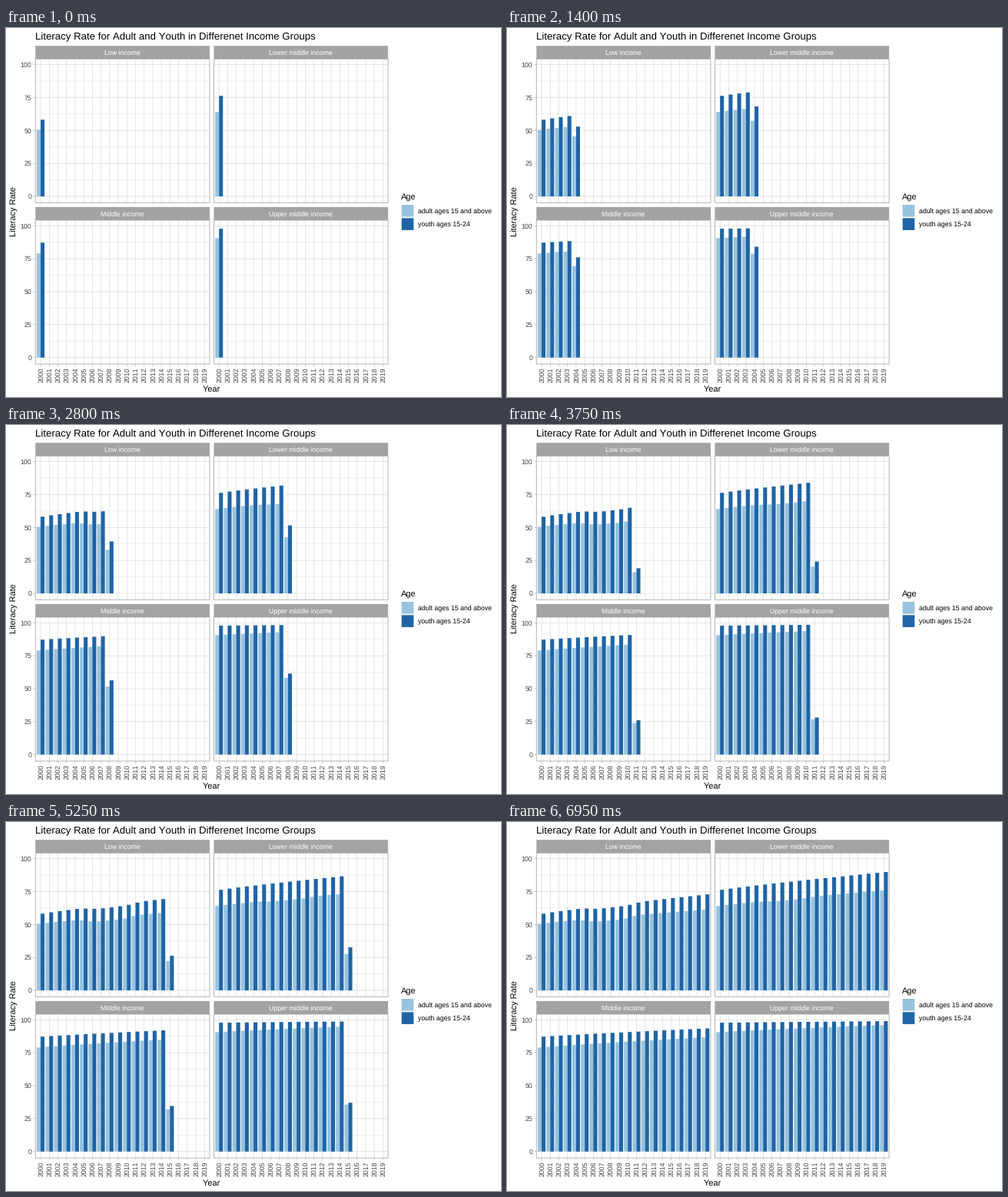
A matplotlib script for the animation above (10000 ms loop, 644 by 480 pixels).

```python
import matplotlib.pyplot as plt
import numpy as np
from matplotlib.animation import FuncAnimation
from matplotlib.collections import LineCollection, PolyCollection
from matplotlib.patches import Rectangle

W, H, DPI = 644, 480, 100
PX = 72 / DPI                      # points per pixel
N_FRAMES, STEP_MS, LAST = 200, 50, 139
N_YEARS = 20

ADULT, YOUTH = "#98C3DE", "#1E64A6"
STRIP, BORDER, GRID = "#A3A3A3", "#B5B5B5", "#D6D6D6"
AXIS_TEXT = "#444444"

LEFT, TOP, GAP = 38.3, 23.2, 5.5
PANEL_W, PANEL_H, STRIP_H = 226.65, 187.1, 17.1
YEAR_W = PANEL_W / (N_YEARS + 0.2)  # 0.6 of a category pads each end
UNIT = 1.714                        # pixels per percentage point
BASE = 8.4                          # zero line above the panel's bottom edge
BAR_W = 0.45 * YEAR_W

# Each age group: rate in 2000, rate in 2019, depth of the dip around 2008
PANELS = {
    "Low income": ((50.5, 61.2, 2.5), (58.2, 72.8, 1.9)),
    "Lower middle income": ((64, 75.8, 1), (76.3, 89.8, 0)),
    "Middle income": ((79, 86.7, 0), (87.2, 93.5, 0)),
    "Upper middle income": ((90.6, 96, 0), (97.8, 99, 0)),
}

plt.rcParams["font.family"] = "Liberation Sans"
plt.rcParams["text.hinting"] = "none"
plt.rcParams["text.kerning_factor"] = 6

fig = plt.figure(figsize=(W / DPI, H / DPI), dpi=DPI, facecolor="white")
ax = fig.add_axes([0, 0, 1, 1])
ax.set_xlim(0, W)
ax.set_ylim(H, 0)
ax.axis("off")

years = np.arange(N_YEARS)
ends = np.round(years * LAST / (N_YEARS - 1))   # frame at which a year is full


def rates(start, end, dip):
    rise = (years / years[-1]) ** 0.9
    return start + (end - start) * rise - dip * np.exp(-((years - 8) / 2.8) ** 4)


def write(x, y, text, size, color="black", ha="left", rotation=0):
    ax.text(x, y, text, fontsize=size * PX, color=color, ha=ha, va="baseline",
            rotation=rotation, rotation_mode="anchor", zorder=6)


def lines(segments, color, width, zorder):
    group = LineCollection(segments, colors=color, linewidths=width * PX,
                           zorder=zorder)
    group.set_snap(False)
    ax.add_collection(group, autolim=False)


def box(x, y, w, h, zorder=4, **style):
    ax.add_patch(Rectangle((x, y), w, h, zorder=zorder, snap=False, **style))


def year_x(left):
    return left + (0.6 + years) * YEAR_W


def corner(index):
    """Left and strip top of a panel in the two by two layout."""
    row, col = divmod(index, 2)
    return LEFT + col * (PANEL_W + GAP), TOP + row * (STRIP_H + PANEL_H + GAP)


def zero_line(strip_top):
    return strip_top + STRIP_H + PANEL_H - BASE


def draw_panel(index, title):
    left, strip_top = corner(index)
    top = strip_top + STRIP_H
    right, bottom = left + PANEL_W, top + PANEL_H
    zero = zero_line(strip_top)
    xs = year_x(left)

    def level(v):
        y = zero - v * UNIT
        return [(left, y), (right, y)]

    lines([level(v) for v in np.arange(12.5, 100, 25)], GRID, 0.3, 1)
    lines([level(v) for v in range(0, 101, 25)]
          + [[(x, top), (x, bottom)] for x in xs], GRID, 0.6, 2)
    box(left, top, PANEL_W, PANEL_H, fill=False, ec=BORDER, lw=PX)
    box(left, strip_top, PANEL_W, STRIP_H, fc=STRIP, ec="none", zorder=5)
    write(left + PANEL_W / 2, strip_top + 11.9, title, 8.8, "white", "center")

    if index % 2 == 0:
        for v in range(0, 101, 25):
            y = zero - v * UNIT
            lines([[(left - 2.75, y), (left, y)]], STRIP, 0.6, 4)
            write(33.2, y + 3.2, str(v), 8.8, AXIS_TEXT, "right")
    if index >= 2:
        lines([[(x, bottom), (x, bottom + 2.75)] for x in xs], STRIP, 0.6, 4)
        for x, year in zip(xs, years):
            write(x + 3.1, 451.6, str(2000 + year), 8.8, AXIS_TEXT, "center", 90)


def bar_group(age, color):
    """Collection of one age group's bars with their geometry."""
    group = PolyCollection([], facecolors=color, edgecolors="none", zorder=3)
    group.set_snap(False)
    ax.add_collection(group, autolim=False)
    spots = []
    for index, series in enumerate(PANELS.values()):
        left, strip_top = corner(index)
        spots.append((year_x(left) + (age - 1) * BAR_W, zero_line(strip_top),
                      rates(*series[age]) * UNIT))
    return group, spots


for index, title in enumerate(PANELS):
    draw_panel(index, title)

write(38, 15.2, "Literacy Rate for Adult and Youth in Differenet Income Groups",
      13.2)
write(267.7, 473, "Year", 11, ha="center")
write(14, 238.7, "Literacy Rate", 11, ha="center", rotation=90)

write(513.6, 223, "Age", 11)
for y, color, label in [(230, ADULT, "adult ages 15 and above"),
                        (247.3, YOUTH, "youth ages 15-24")]:
    box(514.7, y, 15.6, 15.6, fc=color, ec="none")
    write(536.5, y + 11.2, label, 8.8)

groups = [bar_group(0, ADULT), bar_group(1, YOUTH)]


def growth(frame):
    """Share of full height reached by each year's bars."""
    later = np.clip((frame - ends[:-1]) / np.diff(ends), 0, 1)
    return np.concatenate(([1], later))


def update(frame):
    share = growth(min(frame, LAST))
    for group, spots in groups:
        verts = []
        for xs, zero, heights in spots:
            for x, h in zip(xs, heights * share):
                if h > 0:
                    verts.append([(x, zero), (x, zero - h),
                                  (x + BAR_W, zero - h), (x + BAR_W, zero)])
        group.set_verts(verts)
    return [group for group, _ in groups]


anim = FuncAnimation(fig, update, frames=N_FRAMES, interval=STEP_MS,
                     init_func=lambda: update(0), repeat=True,
                     repeat_delay=0, blit=False)
plt.show()
```
